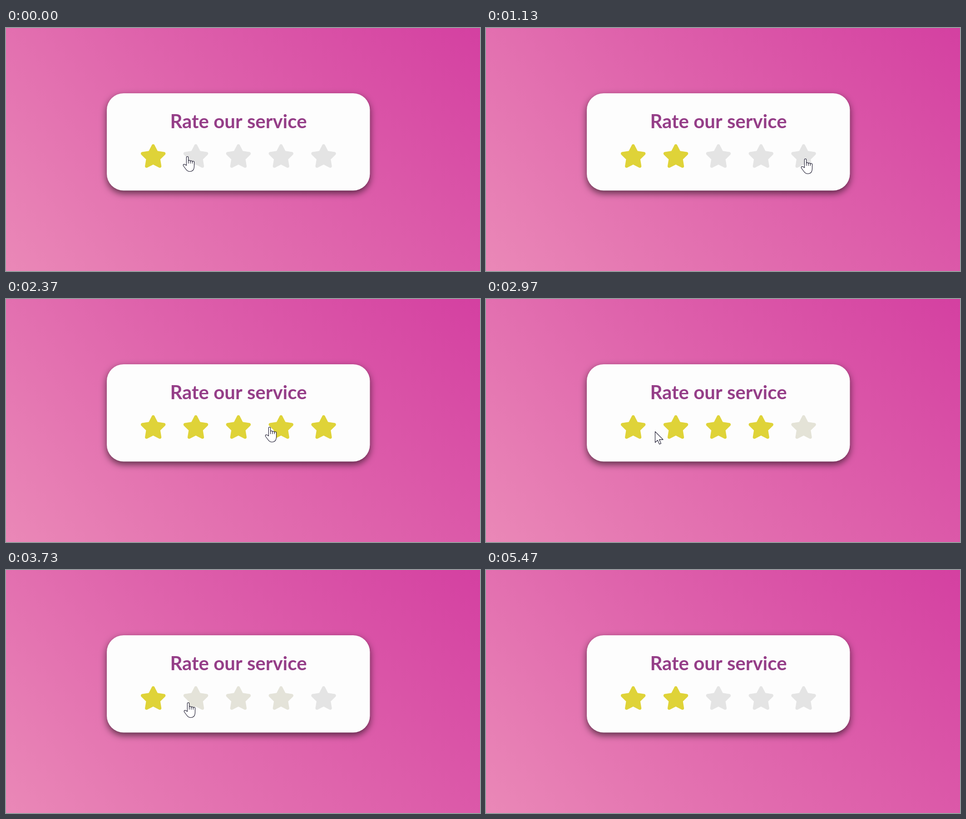
An HTML page with a canvas that plays this animation: 1044x536 px, repeating every 5.51 s.

```html
<!DOCTYPE html>
<html lang="en">
<head>
<meta charset="utf-8">
<title>Rate our service</title>
<style>
html, body { margin: 0; width: 100%; height: 100%; overflow: hidden; }
canvas { display: block; width: 1044px; height: 536px; }
</style>
</head>
<body>
<canvas id="stage" width="1044" height="536"></canvas>
<script>
const W = 1044, H = 536, LOOP = 5510;
const TRAVEL = 500, CLICK_DELAY = 250, FADE = 500;
const YELLOW = [223, 211, 56], GREY = [228, 228, 228];
const ctx = document.getElementById('stage').getContext('2d');

const STAR_Y = 284.7, STAR_HALF = 27;
const starX = i => 324.2 + i * 93.85;

// Each stop: arrival time, pointer position and the rating clicked there
const stops = [
  { at: -900, x: 327, y: 279, rating: 1 },
  { at: 160, x: 421, y: 284, rating: 2 },
  { at: 1140, x: 703, y: 288, rating: 5 },
  { at: 2360, x: 580, y: 282, rating: 4 },
  { at: 3105, x: 327, y: 294, rating: 1 },
  { at: 3880, x: 421, y: 292, rating: 2 },
  { at: 5300, x: 640, y: 580, rating: 2 }
];

const clamp = u => Math.min(1, Math.max(0, u));
const smooth = u => u * u * (3 - 2 * u);
const mix = (a, b, k) => a + (b - a) * k;

function pointerAt(t) {
  let { x, y } = stops[0];
  for (const s of stops) {
    const k = smooth(clamp((t - s.at) / TRAVEL + 1));
    x = mix(x, s.x, k);
    y = mix(y, s.y, k);
  }
  return [x, y];
}

// How far star i has turned yellow, from 0 to 1
function glowAt(i, t) {
  return stops.reduce((glow, s) => {
    const u = clamp((t - s.at - CLICK_DELAY) / FADE);
    return mix(glow, i < s.rating ? 1 : 0, 1 - (1 - u) ** 2);
  }, 0);
}

function starPath(outer, inner, round) {
  const point = i => {
    const r = i % 2 ? inner : outer, a = i * Math.PI / 5 - Math.PI / 2;
    return [r * Math.cos(a), r * Math.sin(a)];
  };
  const path = new Path2D();
  path.moveTo(...point(9));
  for (let i = 0; i < 10; i += 2) {
    path.arcTo(...point(i), ...point(i + 1), round);
    path.lineTo(...point(i + 1));
  }
  path.closePath();
  return path;
}

function handPath() {
  const path = new Path2D();
  const pitch = 4.3, half = pitch / 2;
  path.moveTo(-half, 20);
  // Index finger, then three folded ones
  for (let i = 0; i < 4; i++) {
    const x = i * pitch, top = i ? 7.3 + i : 0;
    path.lineTo(x - half, top + half);
    path.arc(x, top + half, half, Math.PI, 0);
    path.lineTo(x + half, 15);
    path.lineTo(x + half, top + half + 1);
  }
  path.lineTo(15, 21);
  path.bezierCurveTo(15, 29, 11, 33, 5, 33);
  path.bezierCurveTo(-1, 33, -3, 28, -8.6, 21);
  path.bezierCurveTo(-11, 17, -6, 15, -half, 20);
  return path;
}

const star = starPath(32.6, 16.5, 3.4);
const hand = handPath();
const arrow = new Path2D('M0 0 V24 L5.5 19 L9.4 27.8 L13 26.2 L9.1 17.6 H17.6 Z');

// Full-bleed gradient at 45 degrees
const reach = (W + H) / 4;
const sky = ctx.createLinearGradient(
  W / 2 - reach, H / 2 + reach, W / 2 + reach, H / 2 - reach);
sky.addColorStop(0, '#ea88b7');
sky.addColorStop(1, '#d440a1');

function drawCard() {
  ctx.save();
  ctx.shadowColor = 'rgba(0,0,0,.6)';
  ctx.shadowBlur = 16;
  ctx.shadowOffsetY = 6;
  ctx.fillStyle = '#fdfdfd';
  ctx.beginPath();
  ctx.roundRect(222, 144, 579.5, 214.5, 37);
  ctx.fill();
  ctx.restore();

  ctx.fillStyle = '#953e88';
  ctx.font = '700 42px Lato, sans-serif';
  ctx.textAlign = 'center';
  ctx.fillText('Rate our service', W / 2 - 10, 220.5);
}

function drawStars(t) {
  for (let i = 0; i < 5; i++) {
    const glow = glowAt(i, t);
    ctx.save();
    ctx.translate(starX(i), STAR_Y);
    ctx.fillStyle = `rgb(${GREY.map((c, n) => mix(c, YELLOW[n], glow))})`;
    ctx.fill(star);
    ctx.restore();
  }
}

function drawPointer(x, y) {
  const column = Math.round((x - starX(0)) / 93.85);
  const over = Math.abs(x - starX(column)) < STAR_HALF
    && Math.abs(y - STAR_Y) < STAR_HALF;
  const shape = over ? hand : arrow;
  ctx.save();
  ctx.translate(Math.round(x) + .5, Math.round(y) + .5);
  ctx.fillStyle = '#fff';
  ctx.strokeStyle = '#17152b';
  ctx.lineWidth = 1.1;
  ctx.lineJoin = 'round';
  ctx.fill(shape);
  ctx.stroke(shape);
  ctx.restore();
}

function frame() {
  const t = performance.now() % LOOP;
  ctx.fillStyle = sky;
  ctx.fillRect(0, 0, W, H);
  drawCard();
  drawStars(t);
  drawPointer(...pointerAt(t));
  requestAnimationFrame(frame);
}
frame();
</script>
</body>
</html>
```
